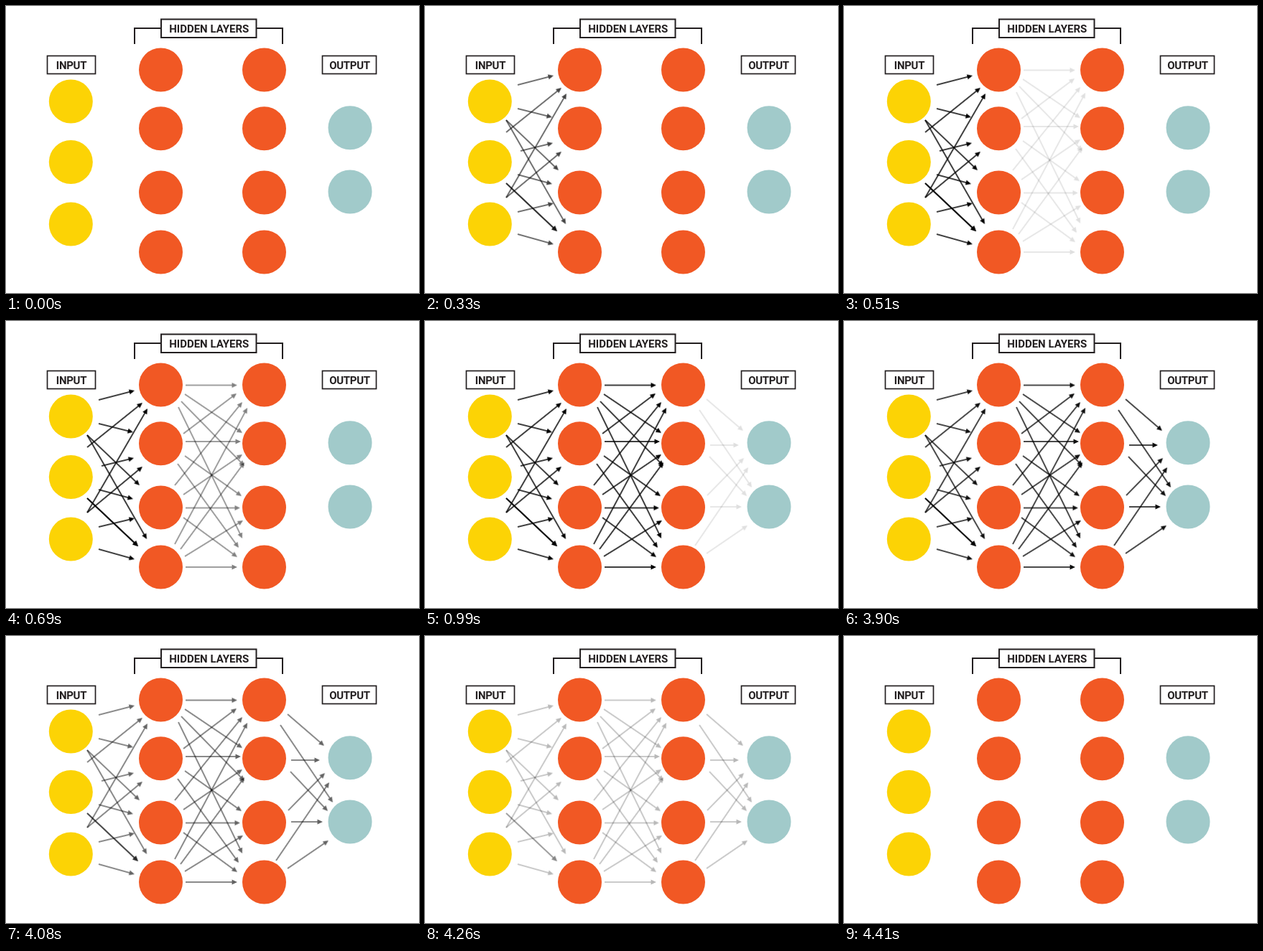
These frames come from a looping animation (575 px wide and 400 px high, 4.44 s). An HTML page:

```html
<!DOCTYPE html>
<html lang="en">
<head>
<meta charset="utf-8">
<title>Neural network layers</title>
<style>
  html, body { margin: 0; width: 100%; height: 100%; overflow: hidden; background: #fff; }
  svg { display: block; width: 575px; height: 400px; }
  text { font: 700 15px Roboto, sans-serif; fill: #231f20; text-anchor: middle; }
  .frame { fill: none; stroke: #231f20; stroke-width: 1.7; }
  .input { fill: #fcd305; }
  .hidden { fill: #f15824; }
  .output { fill: #a1caca; }
  .arrow { stroke: #000; stroke-width: 1.5; opacity: 0; animation: 4440ms infinite; }
  .arrow.first { animation-name: first; }
  .arrow.second { animation-name: second; }
  .arrow.third { animation-name: third; }

  /* One loop is 148 ticks of 30 ms: fades end at ticks 15, 31 and 47, the fade-out spans 129 to 147. */
  @keyframes first {
    0% { opacity: 0; animation-timing-function: steps(15); }
    10.1351% { opacity: 1; }
    87.1622% { opacity: 1; animation-timing-function: steps(18); }
    99.3243%, 100% { opacity: 0; }
  }
  @keyframes second {
    0% { opacity: 0; }
    10.1351% { opacity: 0; animation-timing-function: steps(16); }
    20.9459% { opacity: 1; }
    87.1622% { opacity: 1; animation-timing-function: steps(18); }
    99.3243%, 100% { opacity: 0; }
  }
  @keyframes third {
    0% { opacity: 0; }
    20.9459% { opacity: 0; animation-timing-function: steps(16); }
    31.7568% { opacity: 1; }
    87.1622% { opacity: 1; animation-timing-function: steps(18); }
    99.3243%, 100% { opacity: 0; }
  }
</style>
</head>
<body>
<svg viewBox="0 0 575 400">
  <g class="frame">
    <path d="M179 53V31H216M349 31H385V53" stroke-width="2"/>
    <rect x="216" y="18.5" width="132.5" height="25.5" stroke-width="2"/>
    <rect x="57.5" y="69.5" width="67" height="25"/>
    <rect x="440.5" y="69.5" width="75" height="25"/>
  </g>
  <text x="282.7" y="37">HIDDEN LAYERS</text>
  <text x="91" y="88" letter-spacing="-.3">INPUT</text>
  <text x="478.5" y="88" letter-spacing="-.3">OUTPUT</text>
  <g id="nodes"></g>
  <g id="arrows"></g>
</svg>
<script>
  const HEAD = 7.5, HALF = 3.5;

  function add(parent, tag, attrs) {
    const el = document.createElementNS("http://www.w3.org/2000/svg", tag);
    for (const name in attrs) el.setAttribute(name, attrs[name]);
    return document.getElementById(parent).appendChild(el) && el;
  }

  function column(kind, cx, rows) {
    for (const cy of rows) add("nodes", "circle", { class: kind, cx, cy, r: 30.5 });
  }

  // Shaft and head share one path, so each arrow fades as a unit.
  function arrow(layer, [x1, y1, x2, y2]) {
    const length = Math.hypot(x2 - x1, y2 - y1);
    const angle = Math.atan2(y2 - y1, x2 - x1) * 180 / Math.PI;
    const base = length - HEAD;
    const half = 0.75;
    add("arrows", "path", {
      class: "arrow " + layer,
      style: "stroke: none",
      transform: `translate(${x1} ${y1}) rotate(${angle})`,
      d: `M0 ${-half}H${base}V${-HALF}L${length} 0L${base} ${HALF}V${half}H0Z`
    });
  }

  column("input", 90.3, [133, 217.5, 304]);
  column("hidden", 215.5, [89, 170.7, 260, 343]);
  column("hidden", 359.5, [89, 170.7, 260, 343]);
  column("output", 479, [169.7, 259]);

  // Start and tip of every arrow; the repeated one is drawn twice and fades darker.
  const layers = {
    first: [
      [129, 110, 179, 97], [129, 143, 177, 155], [113, 159, 186, 229], [113, 159, 196, 304],
      [113, 176, 190, 114], [133, 202, 178, 191], [129, 235, 177, 248],
      [113, 247, 184, 314], [113, 247, 184, 314],
      [113, 267, 197, 122], [113, 267, 190, 203], [129, 287, 179, 275], [129, 318, 179, 332]
    ],
    second: [
      [250, 89.5, 322, 89.5], [249, 102, 329, 156], [244, 112, 332, 202], [240, 120, 329, 303],
      [247, 157, 321, 101], [250, 168, 327, 168], [249, 188, 328, 244], [239, 199, 324, 316],
      [235, 229, 329, 113], [247, 242, 329, 186], [250, 260.5, 326, 260.5], [247, 274, 322, 329],
      [235, 311, 336, 121], [243, 318, 332, 197], [249, 328, 330, 278], [250, 343, 322, 343]
    ],
    third: [
      [392, 109, 443, 153], [382, 124, 455, 232], [397, 173, 437, 173], [396, 189, 448, 244],
      [393, 243, 444, 191], [397, 259, 441, 259], [376, 313, 450, 204], [392, 324, 449, 285]
    ]
  };
  for (const layer in layers) layers[layer].forEach(ends => arrow(layer, ends));
</script>
</body>
</html>
```
